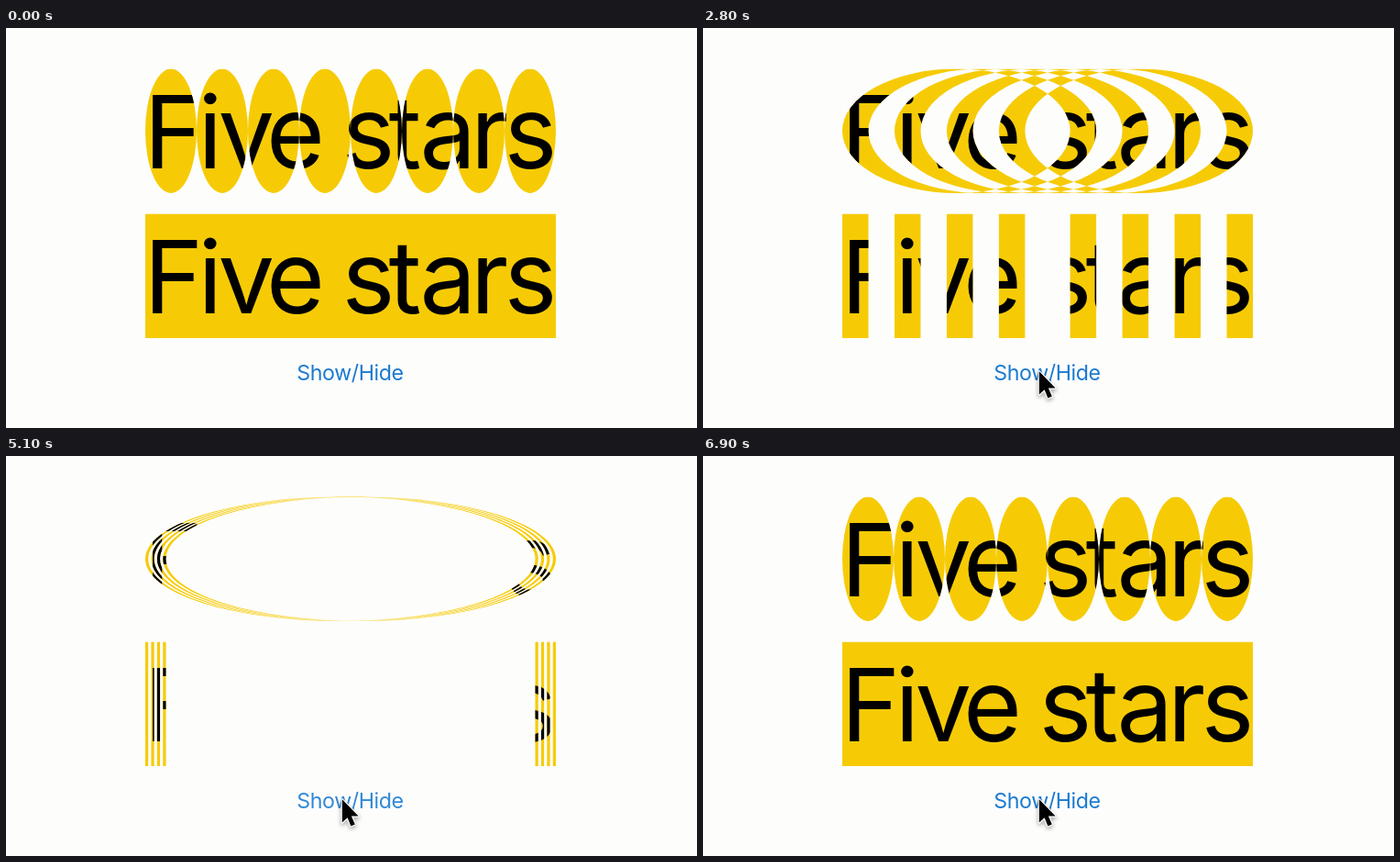
These frames come from a looping animation (754x436 px, 7000 ms). An HTML page with a canvas:

```html
<!DOCTYPE html>
<html lang="en">
<head>
<meta charset="utf-8">
<title>Five stars</title>
<style>
  html, body { margin: 0; width: 100%; height: 100%; overflow: hidden; background: #fdfdfc; }
  canvas { display: block; width: 754px; height: 436px; }
</style>
</head>
<body>
<canvas id="stage" width="754" height="436" role="img" aria-label="Five stars, Show/Hide"></canvas>
<script>
const ctx = document.getElementById('stage').getContext('2d');

const LOOP = 7000, TICK = 100, DURATION = 2000;
const HIDE = 1810, SHOW = 4763;
const COUNT = 8, LEFT = 152, WIDTH = 448, HEIGHT = 135.5;
const BACK = '#fdfdfc', YELLOW = '#f6cb06', BLUE = '#1a7ad0';

// Ink centre of each glyph
const LETTERS = [
  ['F', 184], ['i', 223], ['v', 262], ['e', 316],
  ['s', 395.5], ['t', 435], ['a', 480.5], ['r', 530.5], ['s', 572.5]
];

const clamp = v => Math.min(1, Math.max(0, v));

// cubic-bezier(.42, 0, .58, 1)
function easeInOut(x) {
  if (x <= 0 || x >= 1) return clamp(x);
  let lo = 0, hi = 1, u = 0.5;
  for (let i = 0; i < 30; i++) {
    u = (lo + hi) / 2;
    const at = 1.26 * u * (1 - u) ** 2 + 1.74 * u * u * (1 - u) + u ** 3;
    if (at < x) lo = u; else hi = u;
  }
  return u * u * (3 - 2 * u);
}

const ramp = (t, start, length) => easeInOut((t - start) / length);

function addEllipse(path, x, y, w, h) {
  path.moveTo(x + w, y + h / 2);
  path.ellipse(x + w / 2, y + h / 2, w / 2, h / 2, 0, 0, Math.PI * 2);
}

function addBar(path, x, y, w, h) {
  path.rect(x, y, w, h);
}

function drawGlyph(ch, centre, y) {
  const m = ctx.measureText(ch);
  ctx.fillText(ch, centre + (m.actualBoundingBoxLeft - m.actualBoundingBoxRight) / 2, y);
}

// Equal shapes spread across the label, growing until they all coincide
function drawLabel(y, addShape, progress) {
  if (progress >= 1) return;
  const first = WIDTH / COUNT;
  const w = first + (WIDTH - first) * progress;
  const step = (WIDTH - w) / (COUNT - 1);
  const path = new Path2D();
  for (let i = 0; i < COUNT; i++) addShape(path, LEFT + i * step, y, w, HEIGHT);

  ctx.save();
  ctx.clip(path, 'evenodd');
  ctx.fillStyle = YELLOW;
  ctx.fillRect(LEFT, y, WIDTH, HEIGHT);
  ctx.fillStyle = '#000';
  ctx.font = '109.5px Inter, Roboto, sans-serif';
  ctx.textAlign = 'left';
  for (const [ch, x] of LETTERS) drawGlyph(ch, x, y + 108);
  ctx.restore();
}

function drawButton(t) {
  const press = t >= SHOW - 100 ? SHOW - 100 : HIDE - 100;
  ctx.save();
  ctx.globalAlpha = t < press ? 1 : clamp(0.35 + (t - press) / 800);
  ctx.fillStyle = BLUE;
  ctx.font = '23.2px Inter, Roboto, sans-serif';
  ctx.letterSpacing = '-0.4px';
  ctx.textAlign = 'center';
  ctx.fillText('Show/Hide', 375.5, 384);
  ctx.restore();
}

const arrow = new Path2D('M0 0V25.3L5.8 19.9L9.6 29.1L14 27.2L10.1 18.2H17.8Z');

function drawCursor(t) {
  if (t < 700) return;
  const away = 1 - ramp(t, 700, 800);
  ctx.save();
  ctx.translate(366.8 + 60 * away, 374.3 + 64 * away);
  ctx.lineJoin = 'round';
  ctx.lineWidth = 2.4;
  ctx.strokeStyle = '#fff';
  ctx.shadowColor = 'rgba(0, 0, 0, .4)';
  ctx.shadowBlur = 4;
  ctx.shadowOffsetY = 2;
  ctx.stroke(arrow);
  ctx.shadowColor = 'transparent';
  ctx.fillStyle = '#000';
  ctx.fill(arrow);
  ctx.restore();
}

function draw(t) {
  ctx.fillStyle = BACK;
  ctx.fillRect(0, 0, 754, 436);
  const progress = ramp(t, HIDE, DURATION) - ramp(t, SHOW, DURATION);
  drawLabel(44.5, addEllipse, progress);
  drawLabel(202.5, addBar, progress);
  drawButton(t);
  drawCursor(t);
}

const start = performance.now();

function frame() {
  const t = (performance.now() - start) % LOOP;
  draw(Math.floor(t / TICK) * TICK);
  requestAnimationFrame(frame);
}
frame();
</script>
</body>
</html>
```
